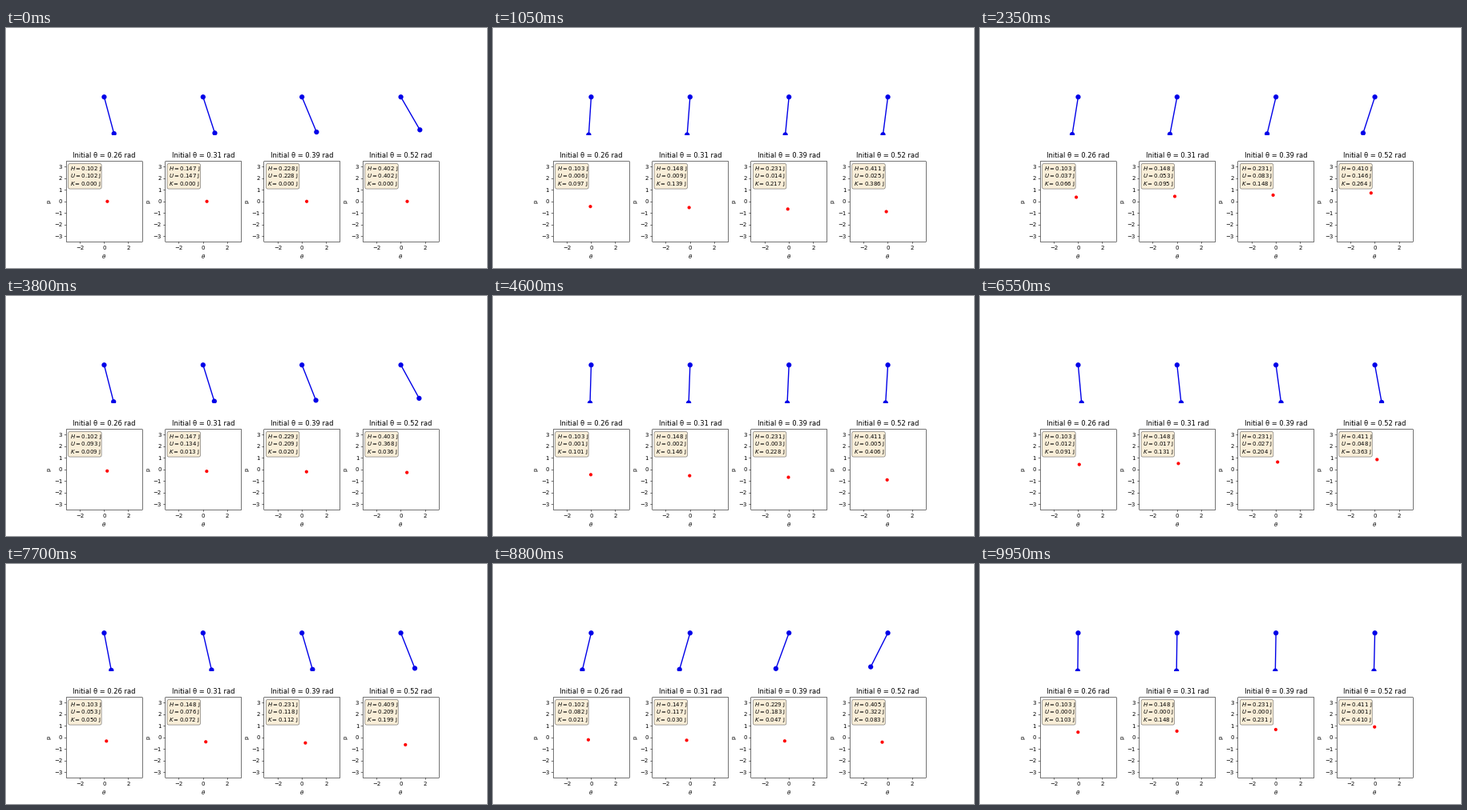
Write a matplotlib script that moves like this. It is 600 px wide and 300 px high and loops after 10 s.

```python
import math

import matplotlib.pyplot as plt
from matplotlib.animation import FuncAnimation
from matplotlib.collections import LineCollection
from matplotlib.patches import Circle, FancyBboxPatch, Rectangle

W, H, DPI = 600, 300, 50
FRAMES, INTERVAL = 200, 50
PT = DPI / 72  # pixels per point

STIFFNESS = 3.0  # m * g * l with m = l = 1
OMEGA = math.sqrt(STIFFNESS)
START_ANGLES = [math.pi / n for n in (12, 10, 8, 6)]

# Panel grid in pixels, y pointing up
LEFT, BOTTOM, TOP = 0.125 * W, 0.11 * H, 0.88 * H
PANEL_W = 0.775 * W / 4.9
PANEL_H = (TOP - BOTTOM) / 2.3
STEP = 1.3 * PANEL_W
PIVOT_Y = TOP - PANEL_H / 2
ROD = PANEL_W / 2

X_SCALE = PANEL_W / (2 * math.pi)
Y_SCALE = PANEL_H / (4 * OMEGA)
TICK = 3.5 * PT
LINE_STEP = 9.6
INFO_W, INFO_H = 37.3, 27.4
BLUE = "#0000e8"

plt.rcParams["font.family"] = "DejaVu Sans"
plt.rcParams["mathtext.fontset"] = "dejavusans"

fig = plt.figure(figsize=(W / DPI, H / DPI), dpi=DPI, facecolor="white")
ax = fig.add_axes([0, 0, 1, 1])
ax.set_xlim(0, W)
ax.set_ylim(0, H)
ax.axis("off")


def label(x, y, text, size=10, ha="center", va="top", **style):
    return ax.text(x, y, text, fontsize=size, ha=ha, va=va, **style)


def disc(x, y, points, color):
    return ax.add_patch(Circle((x, y), points * PT / 2, fc=color, lw=0, zorder=2.2))


def number(n):
    return str(n).replace("-", "\u2212")


# Thin lines sit on a half-pixel grid
def grid_x(x):
    return (math.floor(2 * x + 0.5) + 0.5) / 2


def grid_y(y):
    return H - grid_x(H - y)


class Panel:
    def __init__(self, column, angle):
        self.angle = angle
        self.left = LEFT + column * STEP
        self.cx = self.left + PANEL_W / 2
        self.cy = BOTTOM + PANEL_H / 2
        self.draw_frame()
        self.draw_info()

        view = Rectangle((self.left, PIVOT_Y - ROD), 2 * ROD, 2 * ROD,
                         transform=ax.transData)
        self.rod, = ax.plot([], [], color=BLUE, lw=2)
        self.bob = disc(self.cx, PIVOT_Y, 9, BLUE)
        for part in (self.rod, self.bob):
            part.set_clip_path(view)
        disc(self.cx, PIVOT_Y, 9, BLUE)
        self.dot = disc(self.cx, self.cy, 6, "red")

    def draw_frame(self):
        x0, x1 = grid_x(self.left), grid_x(self.left + PANEL_W)
        y0, y1 = grid_y(BOTTOM), grid_y(BOTTOM + PANEL_H)
        ax.add_patch(Rectangle((x0, y0), x1 - x0, y1 - y0, fill=False,
                               ec="black", lw=0.8, snap=False, zorder=2.5))
        ticks = []
        for n in (-2, 0, 2):
            x = self.cx + n * X_SCALE
            ticks.append([(grid_x(x), y0), (grid_x(x), y0 - TICK)])
            label(x, BOTTOM - 2 * TICK, number(n))
        for n in range(-3, 4):
            y = self.cy + n * Y_SCALE
            ticks.append([(x0, grid_y(y)), (x0 - TICK, grid_y(y))])
            label(self.left - 2 * TICK, y, number(n), ha="right", va="center_baseline")
        ax.add_collection(LineCollection(ticks, colors="black", linewidths=0.8,
                                         snap=False))

        label(self.cx, BOTTOM - 14.1, r"$\theta$")
        label(self.left - 19.4, self.cy, "p", va="baseline",
              rotation=90, rotation_mode="anchor")
        label(self.cx, BOTTOM + PANEL_H + 6 * PT,
              f"Initial \u03b8 = {self.angle:.2f} rad", 12, va="baseline")

    def draw_info(self):
        x = self.left + 0.05 * PANEL_W
        top = BOTTOM + 0.95 * PANEL_H
        ax.add_patch(FancyBboxPatch((x, top - INFO_H), INFO_W, INFO_H,
                                    boxstyle="round,pad=0.3", mutation_scale=10 * PT,
                                    fc="wheat", ec="black", alpha=0.5, zorder=2.6))
        self.lines = [label(x, top - 6 - i * LINE_STEP, "", ha="left", va="baseline")
                      for i in range(3)]

    def update(self, t):
        # Small-angle solution; the energies use the full potential
        theta = self.angle * math.cos(OMEGA * t)
        p = -self.angle * OMEGA * math.sin(OMEGA * t)
        potential = STIFFNESS * (1 - math.cos(theta))
        kinetic = p * p / 2

        x = self.cx + ROD * math.sin(theta)
        y = PIVOT_Y - ROD * math.cos(theta)
        self.rod.set_data([self.cx, x], [PIVOT_Y, y])
        self.bob.center = x, y
        self.dot.center = self.cx + theta * X_SCALE, self.cy + p * Y_SCALE
        energies = (potential + kinetic, potential, kinetic)
        for line, name, value in zip(self.lines, "HUK", energies):
            line.set_text(f"${name} = {value:.3f}$ J")
        return [self.rod, self.bob, self.dot, *self.lines]


panels = [Panel(i, angle) for i, angle in enumerate(START_ANGLES)]


def update(frame):
    t = frame * INTERVAL / 1000
    return [artist for panel in panels for artist in panel.update(t)]


anim = FuncAnimation(fig, update, frames=FRAMES, interval=INTERVAL,
                     init_func=lambda: update(0), repeat=True, repeat_delay=0)

plt.show()
```
